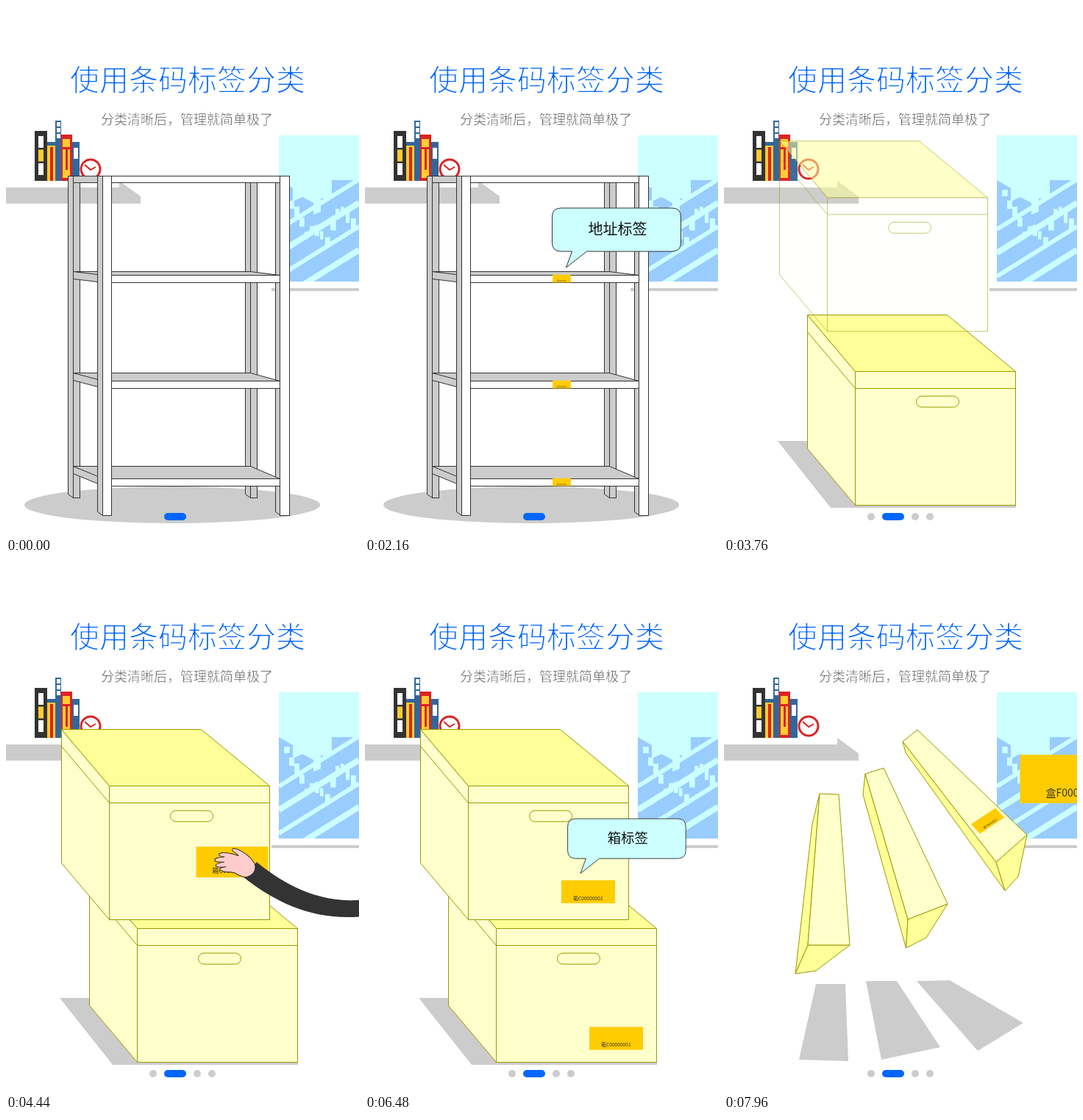
An HTML page for the animation above (8 s loop, 480x720 px).

```html
<!DOCTYPE html>
<html lang="zh">
<head>
<meta charset="utf-8">
<title>使用条码标签分类</title>
<style>
html, body { margin: 0; width: 100%; height: 100%; overflow: hidden; background: #fff; }
svg { display: block; width: 480px; height: 720px; }
text { font-family: "Noto Sans CJK SC", "Noto Sans CJK", "Noto Sans", sans-serif; }
.thin { stroke: #fff; stroke-linejoin: round; }
.pale { fill-opacity: var(--tint, 1); }
</style>
</head>
<body>
<svg id="stage" viewBox="0 0 480 720"></svg>
<script>
const NS = 'http://www.w3.org/2000/svg';
const GREY = '#ccc', INK = '#333', OLIVE = '#990', PALE = '#ffc', LEMON = '#ff9';
const SKY = '#cff', BLUE = '#9cf', NAVY = '#369', RED = '#d22', GOLD = '#fc3';
const LOOP = 8000, LABEL_GAP = 680;

const clamp = v => Math.max(0, Math.min(1, v));
const ramp = (t, start, dur) => clamp((t - start) / dur);
const mix = (a, b, u) => a + (b - a) * u;

function el(parent, tag, attrs = {}, content) {
  const node = document.createElementNS(NS, tag);
  for (const k in attrs) node.setAttribute(k, attrs[k]);
  if (content) node.textContent = content;
  parent.appendChild(node);
  return node;
}
const group = (p, attrs) => el(p, 'g', attrs);
const rect = (p, x, y, width, height, fill, more) => el(p, 'rect', { x, y, width, height, fill, ...more });
const poly = (p, points, fill, more) => el(p, 'polygon', { points, fill, 'stroke-linejoin': 'round', ...more });
const path = (p, d, more) => el(p, 'path', { d, fill: 'none', ...more });
const place = (node, value) => node.setAttribute('transform', value);
const fade = (node, value) => {
  node.setAttribute('opacity', value);
  node.setAttribute('display', value > 0 ? 'inline' : 'none');
};
const inked = { stroke: INK }, olive = { stroke: OLIVE }, paleFace = { stroke: OLIVE, class: 'pale' };

const stage = document.getElementById('stage');

function drawHeading(p) {
  el(p, 'text', { x: 87, y: 115, 'font-size': 40, fill: '#06f', class: 'thin', 'stroke-width': 1.3 }, '使用条码标签分类');
  el(p, 'text', { x: 129, y: 161, 'font-size': 18, fill: '#666', class: 'thin', 'stroke-width': .4 }, '分类清晰后，管理就简单极了');
}

function drawWindow(p) {
  const clip = el(el(p, 'defs'), 'clipPath', { id: 'pane' });
  rect(clip, 371, 176, 109, 199, '#000');
  const g = group(p, { 'clip-path': 'url(#pane)' });
  rect(g, 371, 176, 109, 199, SKY);
  poly(g, '371,237 390,248 390,266 403,260 418,268 418,284 428,280 428,262 443,262 443,237 480,237 480,375 371,375', BLUE);
  let seed = 7;
  const random = () => (seed = seed * 16807 % 2147483647) / 2147483647;
  for (let i = 0; i < 14; i++)
    rect(g, 378 + i * 7, 250 + 70 * random(), 4 + 4 * random(), 6 + 10 * random(), SKY);
  for (let i = 0; i < 4; i++)
    path(g, `M371,${304 + 32 * i} l109,-68`, { stroke: SKY, 'stroke-width': 6 + i % 2 * 2 });
  rect(p, 361, 384, 119, 4, GREY);
}

function drawDesk(p) {
  poly(p, '0,247 154,247 154,238 183,259 183,269 0,269', GREY);
  const book = (x, w, top, fill) => rect(p, x, top, w, 238 - top, fill);
  book(39, 17, 170, INK);
  ['#fff', GOLD, '#fff'].forEach((fill, i) => rect(p, 44, 177 + 18.5 * i, 7, 16, fill));
  book(56, 11, 185, NAVY);
  book(56, 11, 190, GOLD);
  book(60, 4, 192, RED);
  book(67, 8, 156, NAVY);
  for (let i = 0; i < 3; i++) rect(p, 69, 158 + i * 8, 5, 6, '#fff');
  book(75, 15, 175, RED);
  rect(p, 77, 181, 10, 11, GOLD);
  rect(p, 77, 195, 10, 39, GOLD);
  rect(p, 81, 195, 3, 28, RED);
  book(90, 10, 185, NAVY);
  rect(p, 92, 193, 6, 15, '#fff');
  el(p, 'circle', { cx: 115, cy: 222, r: 13, fill: '#fff', stroke: RED, 'stroke-width': 3 });
  path(p, 'M107,216 L115,223 L122,219', { stroke: RED, 'stroke-width': 2 });
}

const planks = [366, 510, 643];

function drawShelf(p) {
  el(p, 'ellipse', { cx: 226, cy: 679, rx: 201, ry: 25, fill: GREY });
  const g = group(p, { transform: 'translate(.5 .5)' });
  const post = (x, foot, width, fill) => {
    poly(g, `${x},231 ${x + 7},231 ${x + 7},${foot} ${x},${foot - 5}`, GREY, inked);
    if (width) rect(g, x + 7, 231, width, foot - 231, fill, inked);
  };
  post(84, 669, 9, GREY);
  post(325, 669, 9, GREY);
  post(366, 693);
  planks.forEach((front, i) => {
    const depth = 5 + 6 * i, back = front - depth, side = back + depth * .8;
    poly(g, `91,${back} 332,${back} 372,${front} 124,${front}`, GREY, inked);
    poly(g, `91,${back} 124,${side} 124,${side + 10} 91,${back + 10}`, GREY, inked);
    rect(g, 131, front, 241, 10, '#fff', inked);
  });
  rect(g, 91, 231, 40, 9, GREY, inked);
  rect(g, 131, 231, 241, 9, '#fff', inked);
  post(124, 693, 12, '#fff');
  rect(g, 372, 231, 13, 462, '#fff', inked);
}

function drawBox(p, dx, dy) {
  const outer = group(p);
  const g = group(outer, { transform: `translate(${dx + .5} ${dy + .5})` });
  poly(g, '75,226 140,303 140,485 75,408', PALE, paleFace);
  rect(g, 140, 303, 218, 182, PALE, paleFace);
  poly(g, '75,226 265,226 358,303 140,303', LEMON, olive);
  path(g, 'M75,249 L140,326 H358', olive);
  rect(g, 223, 336.5, 58, 15, PALE, { rx: 7.5, ...paleFace });
  return outer;
}

// Top corners run far-left, far-right, near-right, near-left; the other faces hang from them.
function drawBar(p, i, top, shadow) {
  const shade = poly(p, shadow, GREY);
  const body = group(p);
  const [a, , c, d] = top;
  const shift = ([x, y], dx, dy) => [x + dx, y + dy];
  const back = shift(a, -10 + 7 * i, 41 - 13 * i);
  const footLeft = shift(d, -17 + 14.5 * i, 39);
  const footRight = shift(c, -46 + 17 * i, 35 + 11 * i);
  poly(body, [a, back, footLeft, d].join(' '), LEMON, olive);
  poly(body, [d, c, footRight, footLeft].join(' '), LEMON, olive);
  poly(body, top.join(' '), PALE, paleFace);
  return { shade, body };
}

// The tail tip sits at the local origin.
function drawBubble(p, x, y, words, start, leave) {
  const node = group(p);
  path(node, 'M-7,-81 H144 Q156,-81 156,-69 V-34 Q156,-22 144,-22 H28 L0,0 L8,-22 H-7 Q-19,-22 -19,-34 V-69 Q-19,-81 -7,-81Z',
    { ...inked, fill: SKY });
  el(node, 'text', { x: 70, y: -45, 'font-size': 20, 'text-anchor': 'middle', fill: '#111' }, words);
  return { node, x, y, start, leave };
}

// The wrist sits at the local origin.
function drawHand(p) {
  const g = group(p);
  path(g, 'M2,-12 C40,4 110,24 174,-15 C250,-50 320,-90 400,-130 V-100 C320,-62 250,-25 174,11 C110,42 50,36 -9,13Z', { fill: INK });
  path(g, 'M0,-9 C-8,-17 -24,-22 -33,-21 C-37,-19 -34,-16 -28,-15 L-24,-13 C-34,-14 -46,-12 -50,-8 ' +
    'C-51,-5 -47,-5 -42,-6 C-50,-3 -55,0 -53,3 C-51,5 -46,2 -40,1 C-48,4 -52,8 -49,10 ' +
    'C-46,11 -40,8 -36,6 C-42,9 -45,12 -42,13 C-36,15 -28,10 -22,11 C-14,13 -6,14 -2,9 C4,4 4,-4 0,-9Z',
    { ...inked, fill: '#fcc' });
  return g;
}

function drawLabel(p, words, spec) {
  const node = group(p);
  rect(node, -77, -33, 154, 66, '#fc0');
  el(node, 'text', { y: 24, 'font-size': 14, 'text-anchor': 'middle', fill: INK }, words);
  return { node, ...spec };
}

drawWindow(stage);
drawDesk(stage);
drawHeading(stage);

const shelfScene = group(stage), boxScene = group(stage), barScene = group(stage);
const bubbleLayer = group(stage);
const shelfLabels = group(stage), boxLabels = group(stage), barLabels = group(stage);

drawShelf(shelfScene);

const boxShadow = poly(boxScene, '73,592 113,592 180,679 397,679 397,683 145,683', GREY);
const boxes = [drawBox(boxScene, 38, 194), drawBox(boxScene, 0, 0)];

const bars = [
  [[[130, 314], [156, 315], [171, 520], [114, 520]], '125,573 165,573 169,678 102,676'],
  [[[192, 287], [217, 279], [304, 464], [250, 485]], '193,569 235,569 294,659 214,676'],
  [[[243, 243], [263, 227], [412, 370], [370, 407]], '262,569 307,568 407,626 345,664']
].map(([top, shadow], i) => drawBar(barScene, i, top, shadow));

const bubbles = [
  drawBubble(bubbleLayer, 273.5, 356, '地址标签', 890, 2880),
  drawBubble(bubbleLayer, 289.5, 423.5, '箱标签', 4640, 6440)
];

// shape: final 2x2 matrix; lift: height above the spot while full size; grip: wrist offset; tilt: arm angle.
const onShelf = { lift: 60, shape: [.162, 0, 0, .162], grip: [35, 3], tilt: 0 };
const onBox = { lift: 132, shape: [.474, 0, 0, .474], grip: [28, 11], tilt: 17 };
const onBar = { ...onBox, shape: [.214, -.143, .18, .197] };
const labels = [
  ...planks.map((front, i) => drawLabel(shelfLabels, `位A0000000${i + 1}`,
    { ...onShelf, x: 267.5, y: front + 5, start: 60 + LABEL_GAP * i })),
  ...[0, 1].map(i => drawLabel(boxLabels, '箱C00000001',
    { ...onBox, x: 303.5 + 38 * i, y: 447.5 + 199.5 * i, start: 4047 + LABEL_GAP * i })),
  ...[0, 1].map(i => drawLabel(barLabels, '盒F00000001',
    { ...onBar, lift: 90 + 42 * i, x: 358.5 - 100 * i, y: 351 + 75 * i, start: 7223 + LABEL_GAP * i }))
];

for (const x of [200, 260, 280]) el(stage, 'circle', { cx: x, cy: 695, r: 5, fill: GREY });
rect(stage, 215, 690, 30, 10, '#06f', { rx: 5 });
const hand = drawHand(stage);

// A label slides in at full size, shrinks onto its spot, then the hand withdraws.
function moveLabel({ node, x, y, lift, shape, grip, tilt, start }, t) {
  const local = t - start;
  fade(node, local >= 0 ? 1 : 0);
  if (local < 0) return;
  const press = ramp(local, 200, 280);
  const away = (1 - ramp(local, 0, 260)) ** 2;
  const cx = mix(x + 13 * (1 - press), 616, away);
  const cy = y - lift * (1 - press);
  const now = [1, 0, 0, 1].map((v, i) => mix(v, shape[i], press).toFixed(4));
  place(node, `matrix(${now} ${cx} ${cy})`);
  if (local < 735) {
    const out = ramp(local, 480, 280) ** 2;
    fade(hand, 1);
    place(hand, `translate(${cx + grip[0] + 60 * away + 240 * out} ${cy + grip[1] - 170 * out}) rotate(${tilt})`);
  }
}

function moveBubble({ node, x, y, start, leave }, t) {
  const grow = 1 - (1 - ramp(t, start, 440)) ** 3;
  const gone = ramp(t, leave, 300);
  const shrink = 1 - .6 * gone;
  fade(node, clamp(2 * grow) * clamp(2 - 2 * gone));
  place(node, `translate(${x + 43 * (1 - shrink)} ${y - 13 * (1 - shrink)}) scale(${grow * shrink})`);
}

// Outlines show first, the pale faces fill in during the second half of the fall.
function drop(node, u) {
  fade(node, u);
  node.style.setProperty('--tint', clamp(2 * u - 1));
  place(node, `translate(0 ${-60 * (1 - u * u)})`);
}

function update(t) {
  const shelfOn = 1 - ramp(t, 2960, 340);
  const boxOn = 1 - ramp(t, 6520, 320);
  for (const node of [shelfScene, shelfLabels]) fade(node, shelfOn);
  for (const node of [boxScene, boxLabels]) fade(node, boxOn);

  fade(boxShadow, ramp(t, 3360, 300));
  boxes.forEach((box, i) => drop(box, ramp(t, 3360 + 240 * i, 300)));
  bars.forEach(({ shade, body }, i) => {
    const u = ramp(t, 6720 + 110 * i, 300);
    fade(shade, u);
    drop(body, u);
  });

  fade(hand, 0);
  labels.forEach(label => moveLabel(label, t));
  bubbles.forEach(bubble => moveBubble(bubble, t));
}

const origin = performance.now();
function tick() {
  update((performance.now() - origin) % LOOP);
  requestAnimationFrame(tick);
}
update(0);
requestAnimationFrame(tick);
</script>
</body>
</html>
```
